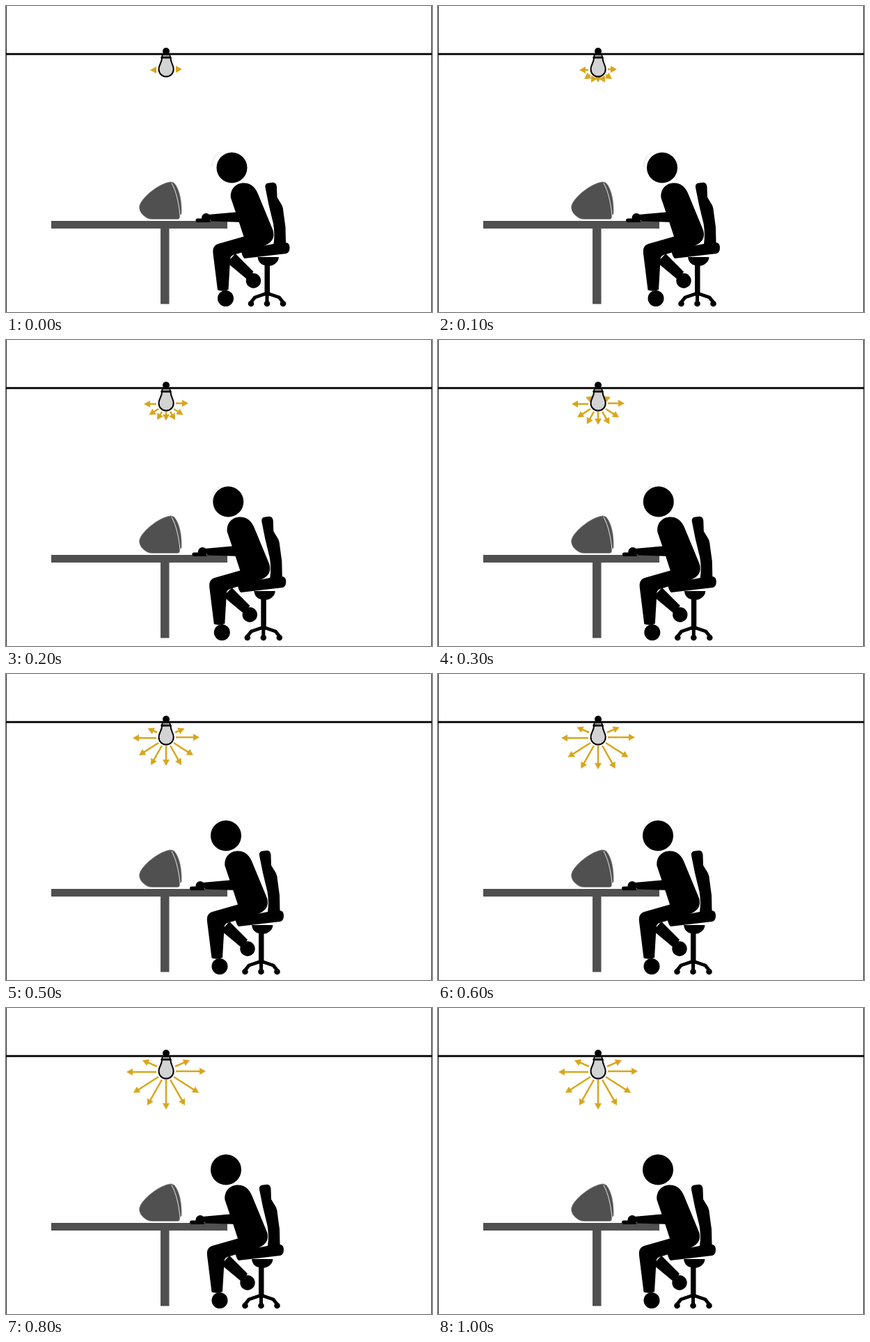
An HTML page with a canvas for the animation above (1700 ms loop, 612 by 440 pixels).

```html
<!DOCTYPE html>
<html lang="en">
<head>
<meta charset="utf-8">
<title>Lamp and desk</title>
<style>
html, body { margin: 0; width: 612px; height: 440px; overflow: hidden; background: #fff; }
canvas { display: block; }
</style>
</head>
<body>
<canvas id="stage" width="612" height="440"></canvas>
<script>
const ctx = document.getElementById('stage').getContext('2d');
const LOOP = 1700, STEP = 100, LAST = 8;
const GOLD = '#d8a61b', DESK = '#505050';

// Per step: sideways reach of the rays, height of the lowest ray, shift of the sitter.
const REACH = [23, 27, 32, 38, 43, 48, 53, 55, 57];
const DROP = [105, 110, 116, 122, 127, 132, 137, 141.5, 146];
const SHIFT = [8.5, 6, 3.3, 0.8, 0];

function fill(path, color) {
  ctx.fillStyle = color;
  ctx.fill(new Path2D(path));
}

function stroke(path, color, width) {
  ctx.strokeStyle = color;
  ctx.lineWidth = width;
  ctx.stroke(new Path2D(path));
}

function disc(x, y, r, color = '#000') {
  ctx.fillStyle = color;
  ctx.beginPath();
  ctx.arc(x, y, r, 0, 2 * Math.PI);
  ctx.fill();
}

function arrow(x1, y1, x2, y2) {
  const head = 9, length = Math.hypot(x2 - x1, y2 - y1);
  ctx.save();
  ctx.translate(x2, y2);
  ctx.rotate(Math.atan2(y2 - y1, x2 - x1));
  ctx.fillStyle = GOLD;
  if (length > head) ctx.fillRect(-length, -1.25, length - head + 1, 2.5);
  ctx.beginPath();
  ctx.moveTo(0, 0);
  ctx.lineTo(-head, -5);
  ctx.lineTo(-head, 5);
  ctx.fill();
  ctx.restore();
}

function drawRays(step) {
  const reach = REACH[step];
  const low = (reach - 27) / 30, high = (reach - 38) / 19;
  for (const side of [-1, 1]) {
    const ray = (x1, y1, x2, y2) => arrow(230 + side * x1, y1, 230 + side * x2, y2);
    const level = side < 0 ? 92 : 91;
    ray(14, level, reach, level);
    if (step >= 1) {
      ray(11, 99, 20 + 27 * low, 105 + 17 * low);
      ray(6, 103, 10 + 17 * low, 110 + 30 * low);
    }
    if (step >= 3) ray(13, 84, 18 + 16 * high, 82 - 7 * high);
  }
  if (step >= 1) arrow(230, 103, 230, DROP[step]);
}

function drawBulb() {
  disc(230, 65, 5);
  fill('M225 68H235L238 75H222Z', '#000');
  fill('M225.5 71H234.5L235 72.5H225Z', '#d3d3d3');
  const glass = 'M224 74.5H236.5C236.5 82 240.7 84 240.7 91A10.6 10.6 0 0 1 219.5 91C219.5 84 224 82 224 74.5Z';
  fill(glass, '#d3d3d3');
  stroke(glass, '#000', 2);
}

function drawDesk() {
  ctx.fillStyle = DESK;
  ctx.fillRect(65, 309, 253, 11);
  ctx.fillRect(222, 320, 12.5, 108.5);
  const shell = 'M236 253C221 255 200 271 193 284C189 292 194 300 203 305Q206 306.500 211 306.500H247Q250 306 249.500 301L252 299C253 281 249 263 242 255Q239 252.500 236 253Z';
  fill(shell, DESK);
  stroke(shell, '#8a8a8a', 0.7);
  stroke('M238 255C245 267 248 281 250 301', '#d4d4d4', 1.1);
}

function drawChair() {
  fill('M364 261Q363 255 369 254.500L375 253.700Q380 254 380.500 260L381 275C386 284 389.500 286 390 296L393 318L393.500 340Q399 341 399 347Q399 355 394 356L334 363Q330 359 329.500 351L376 342Q378 328 375.500 313L369 286Z', '#000');
  fill('M353 361H383.500Q383 369 374 373Q368 375 360 372Q354 369 353 361Z', '#000');
  fill('M363 371H370.500V414H363Z', '#000');
  stroke('M366.500 413L349 419L343.500 426M366.500 413V427M366.500 413L384 419L389.500 426', '#000', 5);
  for (const x of [343.5, 366.5, 389.5]) disc(x, 428, 4.3);
}

function drawSitter() {
  disc(316, 232.5, 22);
  // torso and thigh
  fill('M314.500 276C313 263 322 254.500 333 254.500C343 254.500 349 260 353 269L374.500 321C379 333 373 341 362 345L318 358Q313 360 313.500 366L311 408Q303 411 295.500 408.500L289 356C288 347 291 343.500 298 341.500L333 331.500L326 310Z', '#000');
  // rear leg
  fill('M309 369L321 356L347 382L339 394Z', '#000');
  disc(347, 395, 10.7);
  disc(307, 420.5, 11.5);
  // arm, hand and mouse
  fill('M282 300L327 296L333 311L286 309.500Z', '#000');
  disc(279, 304.5, 6.5);
  fill('M267 305.500H285V311H267Q264 311 264 308Q264 305.500 267 305.500Z', '#000');
}

function draw(step) {
  ctx.fillStyle = '#fff';
  ctx.fillRect(0, 0, 612, 440);
  ctx.lineCap = ctx.lineJoin = 'round';

  ctx.fillStyle = '#333';
  ctx.fillRect(0, 0, 1, 440);
  ctx.fillRect(611, 0, 1, 440);
  ctx.fillStyle = '#000';
  ctx.fillRect(0, 67.7, 612, 2.8);

  drawRays(step);
  drawBulb();
  drawDesk();
  stroke('M296 230Q296 217 306 211', '#f3f3f3', 3);

  ctx.save();
  ctx.translate(SHIFT[Math.min(step, SHIFT.length - 1)], 0);
  drawChair();
  drawSitter();
  ctx.restore();
}

const start = performance.now();
function tick() {
  const time = (performance.now() - start) % LOOP;
  draw(Math.min(LAST, Math.floor(time / STEP)));
  requestAnimationFrame(tick);
}
tick();
</script>
</body>
</html>
```
